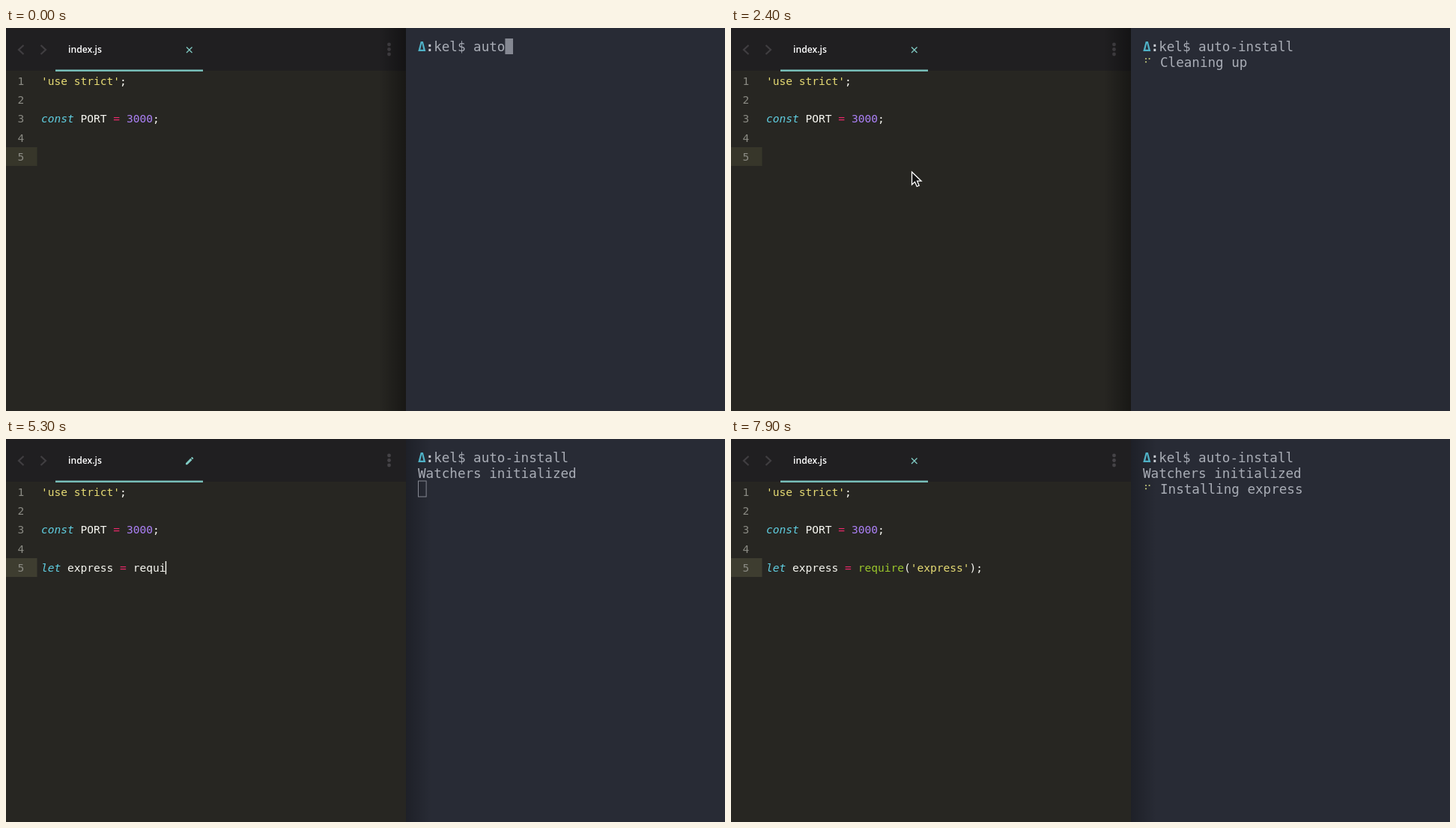
An HTML page that plays this animation: 960x511 px, repeating every 8 s.

```html
<!DOCTYPE html>
<html lang="en">
<head>
<meta charset="utf-8">
<title>Editor and terminal</title>
<style>
  html, body { margin: 0; width: 100%; height: 100%; overflow: hidden; background: #272622; }
  svg { display: block; width: 960px; height: 511px; }
  text { white-space: pre; font: 14.56px "DejaVu Sans Mono", monospace; fill: #f8f8f2; }
  .term text { font-size: 17.58px; fill: #a9adb6; }
  .term .delta { fill: #4fb1c6; font-weight: bold; }
  .term .colon { fill: #c9ccd2; font-weight: bold; }
  .nums text { fill: #8b8b84; text-anchor: middle; }
  .tab { font: 600 12.2px "Open Sans", sans-serif; fill: #fff; }
  .kw { fill: #60cfe2; font-style: italic; }
  .op { fill: #ee2a6c; }
  .num { fill: #ab80f5; }
  .str { fill: #e6db74; }
  .fn { fill: #9ac52c; }
  .popup .match { fill: #1f2325; font-weight: bold; }
</style>
</head>
<body>
<svg viewBox="0 0 960 511">
  <defs>
    <linearGradient id="shadeLeft"><stop stop-color="#000" stop-opacity="0"/><stop offset="1" stop-color="#000" stop-opacity=".38"/></linearGradient>
    <linearGradient id="shadeRight"><stop stop-color="#000" stop-opacity=".25"/><stop offset="1" stop-color="#000" stop-opacity="0"/></linearGradient>
    <filter id="drop" x="-5%" y="-30%" width="110%" height="190%"><feDropShadow dx="0" dy="3" stdDeviation="3" flood-opacity=".45"/></filter>
  </defs>
  <rect width="534" height="511" fill="#272622"/>
  <rect width="534" height="57" fill="#201f21"/>
  <g fill="none" stroke="#403e41" stroke-width="2.2"><path d="M23.5 23l-6.5 6 6.5 6M46.5 23l6.5 6-6.5 6"/></g>
  <g fill="#454347"><circle cx="511.500" cy="22" r="2.4"/><circle cx="511.500" cy="28.500" r="2.4"/><circle cx="511.500" cy="35" r="2.4"/></g>
  <rect x="66" y="55.500" width="197" height="2.500" fill="#78bfb9"/>
  <text class="tab" x="83" y="33">index.js</text>
  <path id="close" d="M241 25.500l7.500 7.500m0-7.500l-7.500 7.500" stroke="#80cbc4" stroke-width="1.3"/>
  <path id="pencil" transform="translate(238.300 22.300) scale(.57)" fill="#80cbc4" d="M3 17.250V21h3.750L17.810 9.940l-3.750-3.750zM15.130 5.120l1.830-1.830q.7-.5 1.410 0l2.340 2.340q.5.7 0 1.410l-1.830 1.830z"/>
  <rect id="row" y="159" width="41.500" height="25"/>
  <g class="nums" id="nums"></g>
  <text x="47" y="76"><tspan class="str">'use strict'</tspan>;</text>
  <text x="47" y="126.400"><tspan class="kw">const</tspan> PORT <tspan class="op">=</tspan> <tspan class="num">3000</tspan>;</text>
  <text id="line" x="47" y="176.800"></text>
  <path id="pair" stroke="#a5cfc8" stroke-width="1.2"/>
  <rect id="caret" y="163" width="1.4" height="17.500" fill="#f8f8f0"/>
  <rect id="editorShade" x="498" width="36" height="511" fill="url(#shadeLeft)"/>

  <g class="term">
    <rect x="534" width="426" height="511" fill="#282b35"/>
    <rect id="termShade" x="534" width="34" height="511" fill="url(#shadeRight)"/>
    <rect id="block" width="10.600" height="21"/>
    <text id="prompt" x="550" y="31"></text>
    <text id="out1" y="52"></text>
    <text id="out2" y="73" x="573">Installing express</text>
    <g id="spinner" fill="#c3c77c"></g>
  </g>

  <g class="popup" id="popup">
    <rect x="233.500" y="188" width="328.500" height="32.500" fill="#b0bec5" filter="url(#drop)"/>
    <text id="hint" x="249" y="208"></text>
  </g>
  <path id="mouse" d="M0 0V17l4-3.700 2.700 6.200 3-1.300-2.600-6h5.500z" fill="#111" stroke="#fff" stroke-width="1.3"/>
</svg>
<script>
const LOOP = 8000, CHAR = 8.765, TERM_CHAR = 10.583;
const FOCUS = 2600, READY = 2800, EDIT = 3050, SAVE = 7500, INSTALL = 7800;
const COMMAND = "auto-install";
const CODE = "let express = require('express');";
const COMMAND_KEYS = [[0, 4], [300, 4], [900, 6], [1100, 9], [1500, 12]];
const CODE_KEYS = [[3000, 0], [3100, 1], [3400, 3], [5300, 19], [5400, 21], [5700, 22],
  [6400, 25], [6700, 25], [6701, 30], [7000, 30], [7400, 33]];
const DOTS = "⠋⠙⠹⠸⠼⠴⠦⠧⠇⠏";

const $ = id => document.getElementById(id);
const show = (id, on) => $(id).setAttribute("visibility", on ? "visible" : "hidden");
const set = (id, attrs) => { for (const k in attrs) $(id).setAttribute(k, attrs[k]); };
const span = (cls, s) => `<tspan class="${cls}">${s}</tspan>`;

// Number of characters typed at time t
function typed(keys, t) {
  const i = keys.findIndex(k => k[0] > t);
  if (i < 0) return keys[keys.length - 1][1];
  if (i === 0) return keys[0][1];
  const [t0, a] = keys[i - 1], [t1, b] = keys[i];
  return Math.floor(a + (b - a) * (t - t0) / (t1 - t0) + 1e-6);
}

function highlight(s) {
  return s.replace(/^let|=|require(?=\()|'[^']*'?/g, m =>
    span(m === "let" ? "kw" : m === "=" ? "op" : m === "require" ? "fn" : "str", m));
}

function drawSpinner(t, y) {
  const frame = Math.max(0, Math.floor(t / 80)) % DOTS.length;
  const bits = DOTS.charCodeAt(frame) - 0x2800;
  let dots = "";
  for (let i = 0; i < 6; i++)
    if (bits >> i & 1) dots += `<circle cx="${554 + (i > 2) * 4.6}" cy="${y + i % 3 * 4.3}" r="1.1"/>`;
  $("spinner").innerHTML = dots;
}

function drawEditor(t) {
  const n = typed(CODE_KEYS, t), focused = t >= FOCUS;
  const dirty = t >= EDIT && t < SAVE;
  const tail = (n > 22 && n < 31 ? "'" : "") + (n > 21 && n < 32 ? ")" : "");
  const text = CODE.slice(0, n) + tail;
  $("line").innerHTML = highlight(text);
  show("close", !dirty);
  show("pencil", dirty);
  set("row", { fill: focused ? "#3e3d30" : "#37362a" });
  show("editorShade", !focused);
  show("termShade", focused);
  show("caret", focused && t < INSTALL);
  set("caret", { x: 46.2 + n * CHAR });

  const inPair = n > 21 && n < 33;
  show("pair", inPair);
  if (inPair) {
    const dash = col => `M${47 + col * CHAR} 181h8.6`;
    set("pair", { d: dash(21) + dash(text.lastIndexOf(")")) });
  }
  const hinting = n > 23 && n < 26;
  show("popup", hinting);
  if (hinting) $("hint").innerHTML = span("match", "express".slice(0, n - 23)) + "express".slice(n - 23);
}

function drawTerminal(t) {
  const n = typed(COMMAND_KEYS, t);
  const entered = t >= 1900, cleaning = t >= 2300 && t < READY, installing = t >= INSTALL;
  $("prompt").innerHTML = span("delta", "Δ") + span("colon", ":") + "kel$ " + COMMAND.slice(0, n);
  $("out1").textContent = cleaning ? "Cleaning up" : t >= READY ? "Watchers initialized" : "";
  set("out1", { x: cleaning ? 573 : 550 });
  show("out2", installing);
  show("spinner", cleaning || installing);
  if (cleaning) drawSpinner(t - 2400, 41);
  if (installing) drawSpinner(t - 7900, 62);

  show("block", !cleaning && !installing);
  const solid = t < FOCUS;
  set("block", {
    x: entered ? 550.5 : 550 + (7 + n) * TERM_CHAR,
    y: t >= READY ? 56 : entered ? 35 : 14,
    fill: solid ? "#858892" : "none",
    stroke: solid ? "none" : "#858892"
  });
}

function drawMouse(t) {
  const p = Math.min(1, Math.max(0, (t - 1900) / 450)), e = p * p * (3 - 2 * p);
  show("mouse", t >= 1900 && t < EDIT);
  set("mouse", { transform: `translate(${760 - 518.5 * e} ${252 - 60 * e})` });
}

function tick(now) {
  const t = now % LOOP;
  drawEditor(t);
  drawTerminal(t);
  drawMouse(t);
  requestAnimationFrame(tick);
}

$("nums").innerHTML = [1, 2, 3, 4, 5].map((n, i) => `<text x="20" y="${76 + i * 25.2}">${n}</text>`).join("");
tick(0);
</script>
</body>
</html>
```
